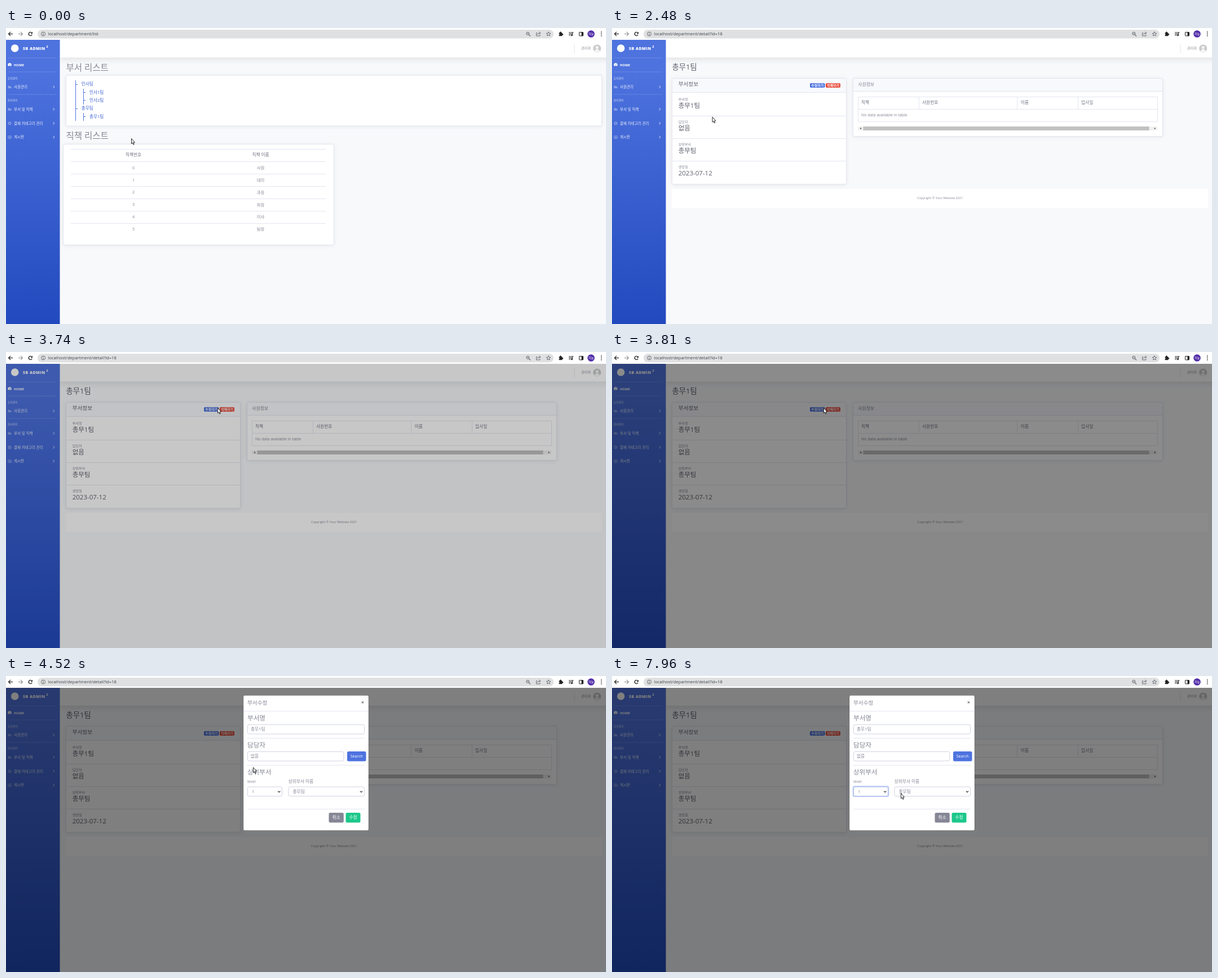
Write an HTML page with a canvas that moves like this. It is 1064 px wide and 526 px high and loops after 8000 ms.

```html
<!DOCTYPE html>
<html lang="ko">
<head>
<meta charset="utf-8">
<title>Department admin</title>
<style>
html, body { margin: 0; width: 100%; height: 100%; overflow: hidden; background: #fff; }
canvas { display: block; }
</style>
</head>
<body>
<canvas id="stage" width="1064" height="526"></canvas>
<script>
const ctx = document.getElementById('stage').getContext('2d');
const LOOP = 8000;
const FAMILY = '"Open Sans", "Noto Sans CJK KR", "Noto Sans CJK JP", sans-serif';
const GRAY = '#858796', DARK = '#5f616e', BLUE = '#4e73df', LINE = '#e3e6f0', PAGE = '#f8f9fb';

const clamp = v => Math.max(0, Math.min(1, v));
const progress = (t, from, to) => clamp((t - from) / (to - from));
const smooth = p => p * p * (3 - 2 * p);

// y is the visual middle of the text
function text(str, x, y, size, color = GRAY, { align = 'left', weight = 400, spacing = 0 } = {}) {
  ctx.font = `${weight} ${size}px ${FAMILY}`;
  ctx.textAlign = align;
  ctx.letterSpacing = spacing + 'px';
  ctx.fillStyle = color;
  ctx.fillText(str, x, y + size * 0.36);
}

function rect(x, y, w, h, color) {
  ctx.fillStyle = color;
  ctx.fillRect(x, y, w, h);
}

function box(x, y, w, h, r, fill, stroke) {
  ctx.beginPath();
  ctx.roundRect(x, y, w, h, r);
  if (fill) { ctx.fillStyle = fill; ctx.fill(); }
  if (stroke) { ctx.strokeStyle = stroke; ctx.lineWidth = 1; ctx.stroke(); }
}

function circle(x, y, r, fill) {
  ctx.beginPath();
  ctx.arc(x, y, r, 0, 7);
  ctx.fillStyle = fill;
  ctx.fill();
}

function ring(x, y, r, color, width = 1, from = 0, to = 7) {
  ctx.beginPath();
  ctx.arc(x, y, r, from, to);
  ctx.strokeStyle = color;
  ctx.lineWidth = width;
  ctx.stroke();
}

function path(points, { fill, stroke, width = 1, close = false }) {
  ctx.beginPath();
  points.forEach(([x, y]) => ctx.lineTo(x, y));
  if (close) ctx.closePath();
  if (fill) { ctx.fillStyle = fill; ctx.fill(); }
  if (stroke) { ctx.strokeStyle = stroke; ctx.lineWidth = width; ctx.stroke(); }
}

function shadowed(color, blur, dy, draw) {
  ctx.save();
  ctx.shadowColor = color;
  ctx.shadowBlur = blur;
  ctx.shadowOffsetY = dy;
  draw();
  ctx.restore();
}

function card(x, y, w, h, headerHeight = 0) {
  shadowed('rgba(58,59,69,.1)', 7, 1, () => box(x, y, w, h, 2.5, '#fff'));
  if (headerHeight) {
    box(x, y, w, headerHeight, [2.5, 2.5, 0, 0], '#f8f9fc');
    rect(x, y + headerHeight - 0.5, w, 1, LINE);
  }
  box(x, y, w, h, 2.5, null, LINE);
}

function chevron(x, y, color = '#444') {
  path([[x - 2, y - 1], [x, y + 1.2], [x + 2, y - 1]], { stroke: color, width: 1.2 });
}

function arrow(x, dir, color) {
  path([[x + 4 * dir, 10.5], [x - 3.5 * dir, 10.5]], { stroke: color, width: 1.2 });
  path([[x, 7], [x - 3.5 * dir, 10.5], [x, 14]], { stroke: color, width: 1.2 });
}

function drawToolbar(t) {
  const ink = '#222', soft = '#5f6368';
  rect(0, 0, 1064, 21, '#fff');
  box(56, 3, 915, 15.5, 7.7, '#dfe0e2');
  arrow(8, 1, ink);
  arrow(26, -1, '#999');
  if (t >= 1260 && t < 1740) {
    path([[40.5, 7.5], [46.5, 13.5]], { stroke: ink, width: 1.3 });
    path([[46.5, 7.5], [40.5, 13.5]], { stroke: ink, width: 1.3 });
  } else {
    ring(43.3, 10.5, 3, ink, 1.3, 0.4, 5.5);
    path([[47, 6.8], [47, 10.2], [43.6, 10.2]], { fill: ink });
  }
  ring(66, 10.5, 3.5, soft, 0.9);
  rect(65.5, 10, 1, 2.8, soft);
  rect(65.5, 8.2, 1, 1, soft);
  text('localhost/department/' + (t < 1340 ? 'list' : 'detail?id=18'), 74.5, 10.7, 7.55, '#3c4043');

  ring(925.3, 9.8, 2.5, soft);
  path([[927.2, 11.7], [930, 14.5]], { stroke: soft, width: 1.2 });
  rect(924, 9.4, 2.6, 0.8, soft);
  path([[942, 8.5], [940.5, 8.5], [940.5, 14], [947, 14], [947, 12]], { stroke: soft, width: 0.9 });
  path([[942.5, 12], [943.5, 9.5], [947, 9]], { stroke: soft, width: 0.9 });
  path([[945.4, 6.8], [948, 9], [945.4, 11]], { stroke: soft, width: 0.9 });
  const star = Array.from({ length: 10 }, (_, i) => {
    const r = i % 2 ? 1.8 : 4, a = i * Math.PI / 5;
    return [962 + r * Math.sin(a), 10.7 - r * Math.cos(a)];
  });
  path(star, { stroke: soft, width: 0.9, close: true });

  box(980.5, 8.3, 6, 6, 0.8, ink);
  circle(983.4, 8, 1.4, ink);
  circle(986.7, 11.3, 1.4, ink);
  circle(980.6, 11.3, 1, '#fff');
  [7.5, 9.9, 12.3].forEach((y, i) => rect(998, y, i == 2 ? 3.5 : 6, 1, ink));
  circle(1003.4, 13, 1.4, ink);
  rect(1004, 7.5, 0.9, 5.5, ink);
  rect(1004, 7.5, 2.5, 1, ink);
  box(1016.5, 7.5, 7, 6.5, 0.5, null, ink);
  rect(1020.5, 7.5, 3, 6.5, ink);
  circle(1037.5, 10.5, 6.3, '#512da8');
  text('하늘', 1037.5, 10.6, 5, '#fff', { align: 'center' });
  [7.2, 10.5, 13.8].forEach(y => circle(1055.8, y, 0.9, ink));
}

function folder(y) {
  const c = 'rgba(255,255,255,.35)';
  rect(3.5, y - 2, 2.6, 1.2, c);
  rect(3.5, y - 1, 6, 3.4, c);
}

function drawSidebar() {
  const g = ctx.createLinearGradient(0, 21, 0, 526);
  g.addColorStop(0.1, BLUE);
  g.addColorStop(1, '#224abe');
  rect(0, 21, 95.5, 505, g);
  circle(15.7, 36, 6.8, '#fff');
  text('SB ADMIN', 30, 36, 7.1, '#fff', { weight: 800, spacing: 0.4 });
  text('2', 71.5, 33.3, 5, '#fff', { weight: 800 });
  [52.5, 77.5, 117.5].forEach(y => rect(3, y, 86, 1, 'rgba(255,255,255,.16)'));

  circle(6.5, 65.5, 3.2, '#fff');
  rect(3, 67.5, 7, 2, '#4b70dc');
  path([[6.3, 67], [7.6, 63.8]], { stroke: BLUE, width: 0.8 });
  text('HOME', 14, 65.5, 5.9, '#fff', { weight: 700 });

  const faint = 'rgba(255,255,255,.5)';
  text('유저관리', 2.8, 89, 4.8, faint, { weight: 700 });
  text('회사관리', 2.8, 128.3, 4.8, faint, { weight: 700 });
  const items = [['사원관리', 104.7], ['부서 및 직책', 144.3], ['결재 카테고리 관리', 169.3], ['게시판', 194]];
  for (const [label, y] of items) {
    text(label, 14, y, 6.55, 'rgba(255,255,255,.88)');
    path([[83.6, y - 2.2], [85.8, y], [83.6, y + 2.2]], { stroke: 'rgba(255,255,255,.85)', width: 1 });
  }
  folder(104.7);
  folder(144.3);
  ring(6.5, 169.3, 2.1, 'rgba(255,255,255,.38)', 1.5);
  box(3.8, 191.8, 5.6, 4.6, 0.4, null, 'rgba(255,255,255,.35)');
  rect(4, 193.8, 5.4, 0.8, 'rgba(255,255,255,.35)');
  rect(6.2, 192, 0.8, 4.4, 'rgba(255,255,255,.35)');
}

function drawTopbar() {
  shadowed('rgba(58,59,69,.15)', 12, 2, () => rect(95.5, 21, 980, 31.5, '#fff'));
  rect(1007.5, 29, 1, 16, LINE);
  text('관리자', 1020, 36.2, 6.2);
  ctx.save();
  ctx.beginPath();
  ctx.arc(1048.2, 36.5, 7, 0, 7);
  ctx.clip();
  rect(1040, 28, 17, 17, '#c9cacc');
  circle(1048.2, 34.5, 2.6, '#f4f4f5');
  circle(1048.2, 42.3, 4.8, '#f4f4f5');
  ctx.restore();
}

function drawList(hover) {
  const link = '#3d60d2';
  text('부서 리스트', 106.5, 70.3, 15.5);
  card(106.5, 84, 950, 90);
  rect(123, 93, 1, 72, BLUE);
  rect(137, 108, 1, 28, BLUE);
  rect(137, 151, 1, 14, BLUE);
  [['인사팀', 0, 99.5], ['인사1팀', 1, 114], ['인사2팀', 1, 128], ['총무팀', 0, 142.5], ['총무1팀', 1, 157]]
    .forEach(([name, depth, y]) => {
      const active = hover && y === 157;
      rect(123 + depth * 14, Math.round(y), 4, 1, BLUE);
      text(name, 133.7 + depth * 14.3, y, 7.6, active ? '#224abe' : link);
      if (active) rect(148, 160, 25.5, 1, '#224abe');
    });

  text('직책 리스트', 106.5, 191.7, 15.5);
  card(101.5, 206.5, 480, 179);
  text('직책번호', 226, 225.7, 7.6, '#707282', { align: 'center' });
  text('직책 이름', 451.5, 225.7, 7.6, '#707282', { align: 'center' });
  rect(115, 215, 452, 1, LINE);
  ['사원', '대리', '과장', '차장', '이사', '팀장'].forEach((name, i) => {
    const y = 248 + i * 21.95;
    rect(115, 237 + i * 22, 452, 1, LINE);
    text(String(i), 226, y, 7.2, GRAY, { align: 'center' });
    text(name, 451.5, y, 7.4, GRAY, { align: 'center' });
  });
}

function drawDetail() {
  text('총무1팀', 106.5, 69.7, 13.3, DARK);
  card(106.5, 89.5, 309, 188, 25);
  text('부서정보', 117.7, 99.8, 9.6, DARK);
  const badge = { align: 'center', weight: 700 };
  box(351, 98, 26.5, 8, 2, BLUE);
  text('수정하기', 364.3, 102, 6, '#fff', badge);
  box(379, 98, 26, 8, 2, '#e74a3b');
  text('삭제하기', 392, 102, 6, '#fff', badge);
  [['부서명', '총무1팀'], ['담당자', '없음'], ['상위부서', '총무팀'], ['생성일', '2023-07-12']]
    .forEach(([label, value], i) => {
      const y = 127.2 + i * 39.9;
      if (i) rect(107, Math.round(116 + i * 40), 308, 1, LINE);
      text(label, 117.7, y, 6.1);
      text(value, 117.7, y + 10.6, 11.5, DARK);
    });

  card(427.5, 89.5, 549, 103, 23);
  text('사원정보', 436.3, 100, 7.8);
  box(436.5, 122.5, 531, 44, 0, null, LINE);
  rect(437, 144, 530, 1, LINE);
  [544, 718, 826].forEach(x => rect(x, 122, 1, 22, LINE));
  [['직책', 442], ['사원번호', 550], ['이름', 724.7], ['입사일', 832]]
    .forEach(([name, x]) => text(name, x, 132.4, 7.7, '#707282'));
  text('No data available in table', 442, 154.7, 6.95);
  rect(436, 175, 531, 7, '#f1f1f1');
  rect(445.5, 175, 507, 7, '#c1c1c1');
  path([[442, 176.7], [439.6, 178.5], [442, 180.3]], { fill: '#505050' });
  path([[961.8, 176.7], [964.2, 178.5], [961.8, 180.3]], { fill: '#505050' });

  rect(106.5, 286, 950.5, 33.5, '#fff');
  text('Copyright © Your Website 2021', 581.7, 302, 5.6, GRAY, { align: 'center' });
}

function field(x, y, w, value, focus) {
  if (focus) box(x - 1.5, y - 1.5, w + 3, 20, 3.5, 'rgba(78,115,223,.3)');
  box(x + 0.5, y + 0.5, w - 1, 16.5, 2.5, '#fff', focus ? '#a3b4ec' : '#d1d3e2');
  text(value, x + 6, y + 8.7, 7.7);
}

function button(x, y, w, label, color, size) {
  box(x, y, w, 17.5, 2.5, color);
  text(label, x + w / 2, y + 8.4, size, '#fff', { align: 'center' });
}

function drawModal(t) {
  const focus = t >= 6040;
  box(421, 34.5, 222, 240, 2.5, '#fff', 'rgba(0,0,0,.2)');
  text('부서수정', 428, 47.7, 9.6);
  text('×', 632.5, 46.3, 9.5, '#6b6b70', { align: 'center', weight: 700 });
  rect(421.5, 62, 221, 1, LINE);
  [110, 158, 236].forEach(y => rect(428, y, 208, 1, LINE));
  text('부서명', 428, 75, 11.6);
  field(428, 86, 208, '총무1팀');
  text('담당자', 428, 123, 11.6);
  field(428, 134, 171.5, '없음');
  button(605, 134, 33.5, 'Search', BLUE, 7);
  text('상위부서', 428, 171.3, 11.5);
  text('level', 428, 187.5, 7);
  text('상위부서 이름', 500.7, 187.3, 7.7);
  field(428, 196.5, 62, ' 1', focus);
  field(500.5, 196.5, 135.5, ' 총무팀');
  chevron(484.3, 205.5);
  chevron(630, 205.5);
  button(572.5, 243, 26.3, '취소', GRAY, 7.7);
  button(602.5, 243, 26, '수정', '#1cc88a', 7.7);
}

function drawOptions(active) {
  shadowed('rgba(0,0,0,.35)', 4, 2, () => rect(428, 214, 62, 32.5, '#fff'));
  box(428.5, 214.5, 61, 32, 0, '#fff', '#666');
  for (let i = 0; i < 3; i++) {
    const on = i === active;
    if (on) rect(429, 214.8 + i * 10.5, 60, 10.5, '#1e90ff');
    text(String(i), 435.5, 219.6 + i * 10.6, 7, on ? '#fff' : GRAY, { weight: on ? 700 : 400 });
  }
}

// time, x, y of the pointer's hot spot
const TRACK = [
  [0, 222, 196], [250, 222, 196], [260, 222, 195], [470, 222, 195], [1180, 166, 161],
  [2430, 166, 161], [2800, 389, 97], [3010, 375, 99], [3850, 375, 99], [4330, 438, 162],
  [4520, 438, 162], [4790, 435, 159], [4940, 435, 159], [5290, 586, 158], [5700, 586, 158],
  [6050, 476, 206], [6280, 474, 230], [6430, 474, 230], [6470, 474, 215], [6650, 474, 207],
  [6890, 474, 215], [7100, 474, 215], [7290, 474, 230], [7510, 474, 230], [7960, 512, 208],
  [LOOP, 512, 208]
];

function pointerAt(t) {
  const i = TRACK.findIndex(k => k[0] > t);
  const [t0, x0, y0] = TRACK[i - 1], [t1, x1, y1] = TRACK[i];
  const p = smooth(progress(t, t0, t1));
  return [x0 + (x1 - x0) * p, y0 + (y1 - y0) * p];
}

function drawPointer(x, y, hand) {
  ctx.save();
  ctx.translate(x, y);
  ctx.lineJoin = 'round';
  const style = { fill: '#fff', stroke: '#111', width: 0.9, close: true };
  if (hand) {
    path([[-1, -0.5], [0, -1.3], [1, -0.5], [1, 3.5], [3, 3.7], [5, 4.6], [5.3, 8], [4, 11.5],
      [-0.8, 11.5], [-3.8, 6.8], [-3, 6], [-1, 7.5]], style);
    [1, 2.5, 4].forEach(dx => rect(dx - 0.3, 4, 0.6, 2.2, '#111'));
  } else {
    path([[0.5, 0.5], [0.5, 9.6], [2.4, 7.9], [3.9, 11.2], [5.3, 10.5], [3.9, 7.4], [6.4, 7.2]], style);
  }
  ctx.restore();
}

function draw(t) {
  const [x, y] = pointerAt(t);
  const onList = t < 1600;
  const hover = onList && x < 173.5 && y < 165;

  rect(0, 0, 1064, 526, PAGE);
  drawTopbar();
  drawSidebar();
  if (onList) drawList(hover); else drawDetail();

  const dim = 0.5 * progress(t, 3675, 3825);
  if (dim) rect(0, 21, 1064, 505, `rgba(0,0,0,${dim})`);

  const shown = progress(t, 3840, 4140);
  if (shown) {
    ctx.save();
    ctx.beginPath();
    ctx.rect(0, 21, 1064, 505);
    ctx.clip();
    ctx.globalAlpha = progress(t, 3840, 3990);
    ctx.translate(0, -21 * (1 - shown) ** 2);
    drawModal(t);
    ctx.restore();
  }
  if (t >= 6080 && t < 7560) drawOptions(t >= 6530 && t < 7230 ? 0 : 1);

  drawToolbar(t);
  drawPointer(x, y, hover);
}

const start = performance.now();
function tick() {
  draw((performance.now() - start) % LOOP);
  requestAnimationFrame(tick);
}
tick();
</script>
</body>
</html>
```
